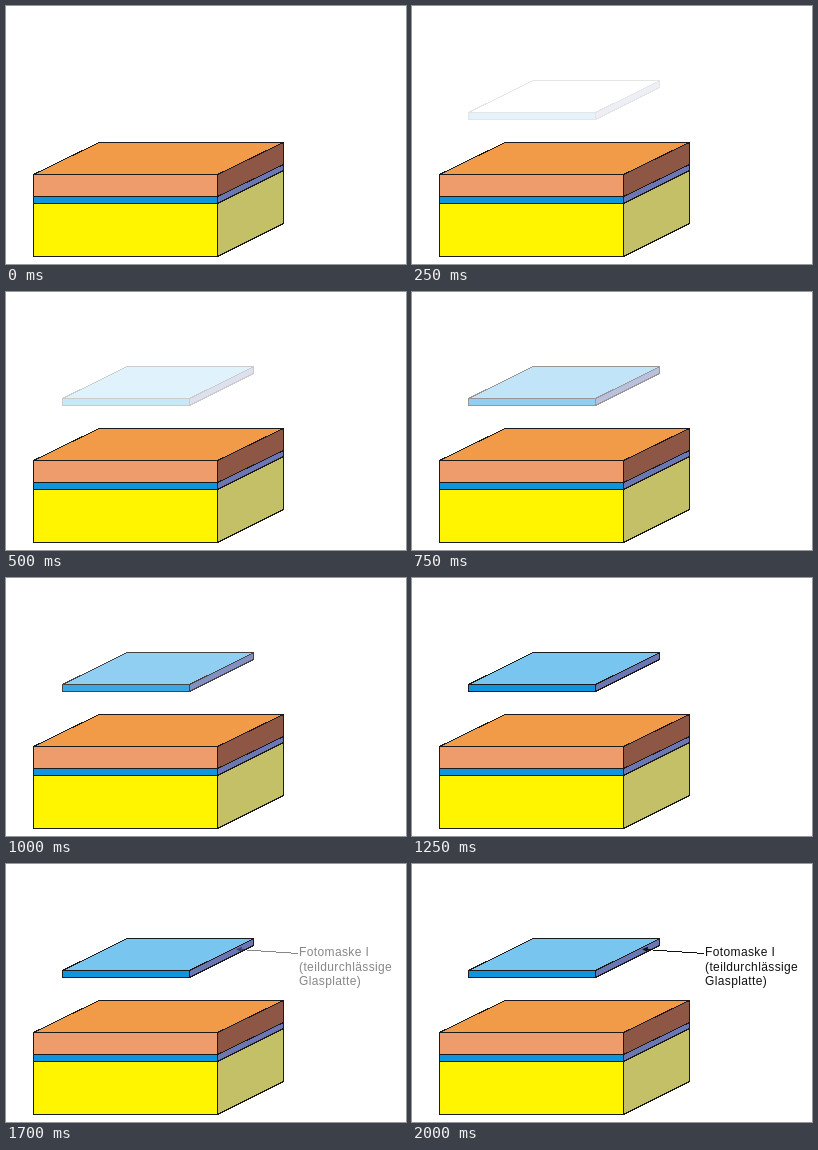
These frames come from a looping animation (400 by 258 pixels, 4000 ms). An HTML page:

```html
<!DOCTYPE html>
<html lang="de">
<head>
<meta charset="utf-8">
<style>
  html, body { margin: 0; width: 100%; height: 100%; overflow: hidden; background: #fff; }
  svg { display: block; width: 400px; height: 258px; }
  polygon { stroke: #1c1a1a; stroke-width: 1; }
  polygon, line { shape-rendering: crispEdges; }
  text { font: 12px "Liberation Sans", Arial, sans-serif; letter-spacing: .38px; fill: #111; }
</style>
</head>
<body>
<svg viewBox="0 0 400 258">
  <g id="block"></g>
  <g id="plate"></g>
  <g id="label">
    <line x1="233" y1="85.5" x2="292" y2="89.5" stroke="#111"/>
    <path d="M230 85.2L236 82.8L235.5 88Z" fill="#111"/>
    <text x="293" y="92">Fotomaske I</text>
    <text x="293" y="107">(teildurchlässige</text>
    <text x="293" y="121">Glasplatte)</text>
  </g>
</svg>
<script>
const LOOP = 4000;
const PLATE_ALPHA = [0, .11, .22, .45, .81, 1];
const byId = id => document.getElementById(id);

function face(parent, points, fill) {
  const el = document.createElementNS('http://www.w3.org/2000/svg', 'polygon');
  el.setAttribute('points', points.join(' '));
  el.setAttribute('fill', fill);
  parent.append(el);
  return el;
}

// Front and right face of one layer; (dx, -dy) leads to the back edge.
function layer(parent, left, right, top, bottom, dx, dy, front, side) {
  face(parent, [left, top, right, top, right, bottom, left, bottom], front);
  face(parent, [right, top, right + dx, top - dy, right + dx, bottom - dy, right, bottom], side);
}

function lid(parent, left, right, y, dx, dy, fill) {
  return face(parent, [left, y, right, y, right + dx, y - dy, left + dx, y - dy], fill);
}

const block = byId('block'), plate = byId('plate'), label = byId('label');
layer(block, 27.5, 211.5, 197.5, 250.5, 66, 33, '#fff500', '#c4c067');
layer(block, 27.5, 211.5, 190.5, 197.5, 66, 33, '#0e95de', '#6a77b4');
layer(block, 27.5, 211.5, 168.5, 190.5, 66, 32, '#ee9c6c', '#8e5645');
lid(block, 27.5, 211.5, 168.5, 65.5, 32, '#f19a48');
layer(plate, 56.5, 183.5, 106.5, 113.5, 64, 32, '#0e95de', '#6a77b4');
const plateTop = lid(plate, 56.5, 183.5, 106.5, 64.5, 32, '#78c5f0');

function draw() {
  const t = performance.now() % LOOP;
  const step = Math.min(5, Math.floor(t / 250));
  plate.setAttribute('opacity', PLATE_ALPHA[step]);
  plateTop.setAttribute('fill', step < 2 ? '#fff' : '#78c5f0');
  const labelStep = Math.floor((t - 1500) / 100) + 1;
  label.setAttribute('opacity', Math.max(0, Math.min(1, labelStep / 6)));
  requestAnimationFrame(draw);
}
draw();
</script>
</body>
</html>
```
